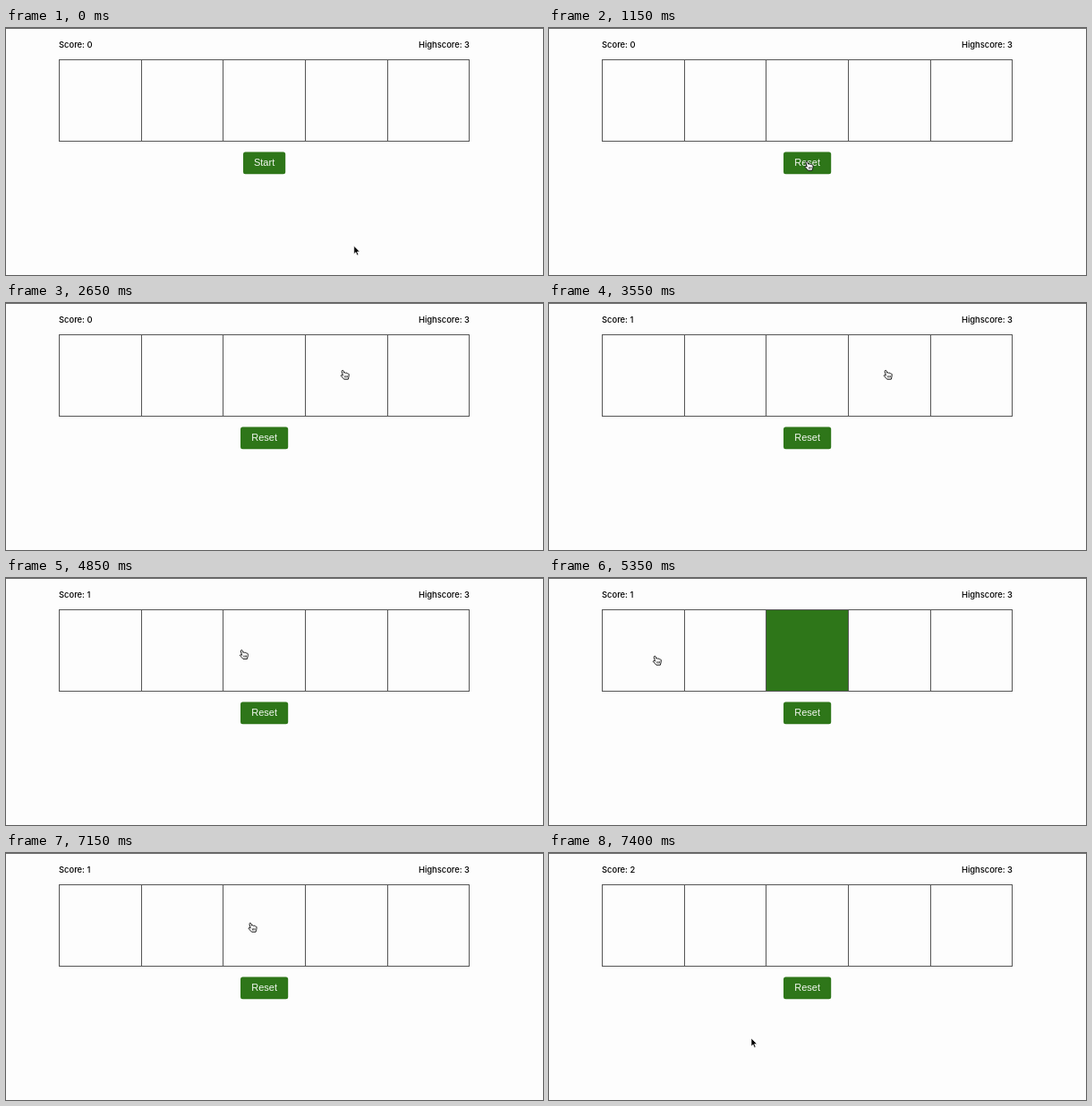
An HTML page for the animation above (8000 ms loop, 600 by 276 pixels).

```html
<!DOCTYPE html>
<html lang="en">
<head>
<meta charset="utf-8">
<title>Memory game</title>
<style>
  html, body { margin: 0; width: 100%; height: 100%; overflow: hidden; background: #fdfdfd; }
  svg { display: block; width: 600px; height: 276px; }
  .label { font: 500 9.4px Inter, sans-serif; fill: #000; }
  .caption { font: 11px "Liberation Sans", Arial, sans-serif; fill: #f4f8f2; text-anchor: middle; }
  .cell { fill: #fdfdfd; stroke: #555; }
  .lit, #button { fill: #2e7619; }
</style>
</head>
<body>
<svg viewBox="0 0 600 276">
  <rect width="600" height="1" fill="#6b6b6b"/>
  <text class="label" id="score" x="59" y="21.5"></text>
  <text class="label" x="518" y="21.5" text-anchor="end">Highscore: 3</text>
  <g id="board"></g>
  <rect id="button" y="138.6" height="24.6" rx="2.5"/>
  <text class="caption" id="caption" x="288.6" y="154.3"></text>
  <g id="cursor">
    <path id="arrow" d="M0 0V9L2.1 7.1 3.5 10.4 5 9.7 3.6 6.5 6.4 6.4Z" stroke="#fff" stroke-width=".6"/>
    <g id="hand" transform="translate(2.5 5.2)" fill="#fff" stroke="#000" stroke-width=".9" stroke-linejoin="round">
      <path d="M-2.3 .9L-3.5 -3.6C-3.8 -5.2 -2 -5.5 -1.5 -4.1L-.9 -2C-.4 -2.7 .7 -2.7 1 -1.8C1.6 -2.3 2.5 -2.1 2.8 -1.3C3.6 -1.6 4.4 -1.1 4.5 -.2C4.7 2 3.9 2.8 3.6 5H-1C-1.8 3.5 -3.2 2.7 -4.3 1.5C-5 .3 -3.3 -.1 -2.3 .9Z"/>
      <path d="M-.2 1.2l.3 2M1.2 1l.2 2.2M2.6 1v2" stroke-width=".7"/>
    </g>
  </g>
</svg>
<script>
const LOOP = 8000, STEP = 50;
const SHOW_EVERY = 1000, SHOW_FOR = 500, CLICK_FOR = 200, STARTED_AT = 1150;
const LEFT = 59, TOP = 35.5, CELL_W = 91.65, CELL_H = 91, COUNT = 5;
const BUTTON_X = 288.6, BUTTON_Y = 138.6, BUTTON_H = 24.6;
const $ = id => document.getElementById(id);

const rounds = [
  { shownAt: 2150, cells: [3], clicks: [3350] },
  { shownAt: 4350, cells: [0, 2], clicks: [6450, 7200] },
];

// Where the pointer rests, and when it sets off for each place
const stops = [
  { at: 0, for: 1, x: 388.8, y: 243.5 },
  { at: 200, for: 450, x: 288, y: 149 },
  { at: 1650, for: 150, x: 348.5, y: 193 },
  { at: 2450, for: 200, x: 376.2, y: 75 },
  { at: 4750, for: 400, x: 118.3, y: 87 },
  { at: 6550, for: 200, x: 273, y: 78 },
  { at: 7250, for: 150, x: 226, y: 207 },
];

const edge = i => Math.round(LEFT + i * CELL_W) + 0.5;

function setAttributes(node, attributes) {
  for (const name in attributes) node.setAttribute(name, attributes[name]);
}

const cells = Array.from({ length: COUNT }, (_, i) => {
  const cell = document.createElementNS("http://www.w3.org/2000/svg", "rect");
  setAttributes(cell, { class: "cell", x: edge(i), y: TOP, width: edge(i + 1) - edge(i), height: CELL_H });
  return $("board").appendChild(cell);
});

const during = (t, from, length) => t >= from && t < from + length;
const inside = (p, x, y, w, h) => p.x >= x && p.x <= x + w && p.y >= y && p.y <= y + h;
const easeOut = k => 1 - (1 - k) ** 2;

function pointerAt(t) {
  const i = stops.findLastIndex(stop => stop.at <= t);
  const to = stops[i], from = stops[i - 1] || to;
  const k = easeOut(Math.min(1, (t - to.at) / to.for));
  return { x: from.x + (to.x - from.x) * k, y: from.y + (to.y - from.y) * k };
}

function isLit(cell, t) {
  return rounds.some(round => round.cells.some((c, k) => c === cell &&
    (during(t, round.shownAt + k * SHOW_EVERY, SHOW_FOR) || during(t, round.clicks[k], CLICK_FOR))));
}

function draw(t) {
  const started = t >= STARTED_AT;
  const width = started ? 53.2 : 47.2, buttonLeft = BUTTON_X - width / 2;
  $("caption").textContent = started ? "Reset" : "Start";
  setAttributes($("button"), { x: buttonLeft, width });
  $("score").textContent = "Score: " + rounds.filter(round => t >= round.clicks.at(-1)).length;
  cells.forEach((cell, i) => cell.classList.toggle("lit", isLit(i, t)));

  const pointer = pointerAt(t);
  const clickable = inside(pointer, LEFT, TOP, CELL_W * COUNT, CELL_H)
    || inside(pointer, buttonLeft, BUTTON_Y, width, BUTTON_H);
  $("cursor").setAttribute("transform", `translate(${pointer.x} ${pointer.y})`);
  $("hand").style.display = clickable ? "" : "none";
  $("arrow").style.display = clickable ? "none" : "";
}

const start = performance.now();
function tick() {
  const t = (performance.now() - start) % LOOP;
  draw(Math.floor(t / STEP) * STEP);
  requestAnimationFrame(tick);
}
tick();
</script>
</body>
</html>
```
